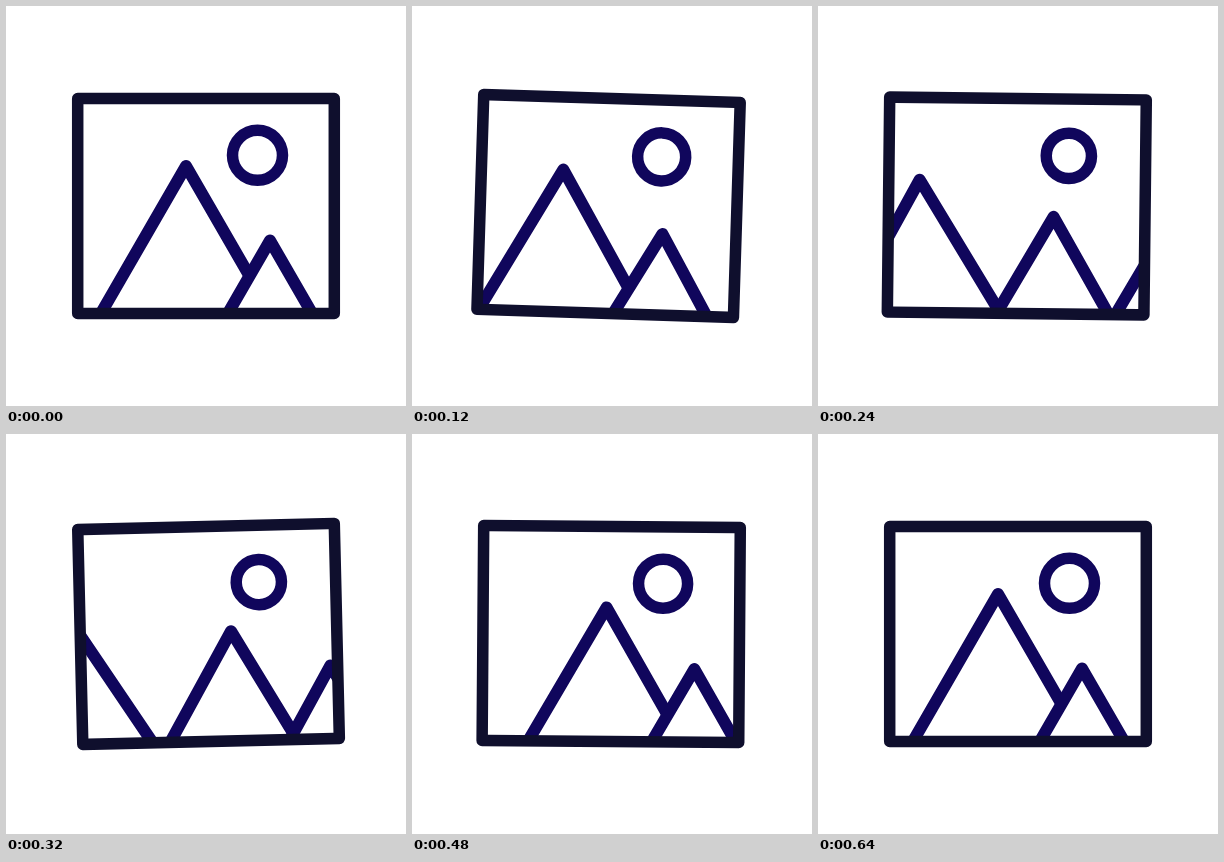
Recreate the animation shown at these times as an HTML page without scripts. Size 400x400 px, loop 720 ms.

```html
<!DOCTYPE html>
<html lang="en">
<head>
<meta charset="utf-8">
<title>Swinging picture</title>
<style>
  @property --n { syntax: "<number>"; inherits: true; initial-value: 0; }
  @property --t { syntax: "<number>"; inherits: true; initial-value: 0; }
  @property --p { syntax: "<number>"; inherits: true; initial-value: 0; }
  @property --q { syntax: "<number>"; inherits: true; initial-value: 1; }

  html, body { margin: 0; width: 100%; height: 100%; overflow: hidden; background: #fff; }

  /* --n counts 40 ms ticks, --t is linear progress, --p eased progress, --q what remains */
  svg {
    display: block; width: 100%; height: 100%;
    --t: min(1, var(--n) / 16);
    --p: calc(.25 * var(--t)
      + .75 * pow(var(--t), 2) * (3 - 2 * var(--t))
      - .4 * pow(var(--t), 2) * pow(1 - var(--t), 4));
    --q: calc(1 - var(--p));
    animation: tick 720ms steps(18) infinite;
    fill: #fff; stroke: #10065c; stroke-width: 11.5; stroke-linejoin: round;
  }
  @keyframes tick { from { --n: 0; } to { --n: 18; } }

  /* Damped swing built from four half-cosine moves */
  .picture {
    --a: cos(clamp(0deg, var(--n) * 48deg, 180deg));
    --b: cos(clamp(0deg, (var(--n) - 4.25) * 45deg, 180deg));
    --c: cos(clamp(0deg, (var(--n) - 7.75) * 45deg, 180deg));
    --d: cos(clamp(0deg, (var(--n) - 12) * 45deg, 180deg));
    transform-origin: 200px 92px;
    transform: rotate(calc(1deg * (1.7 * var(--b) - var(--a) - .91 * var(--c) + .21 * var(--d))));
  }

  /* The sun shrinks a little and grows back over 14 ticks */
  .sun { r: calc(23.75px + 1.25px * cos(min(360deg, var(--n) * 360deg / 14))); }

  .peak { stroke-width: 12; }
  .leaving {
    transform:
      translate(calc(180px - 240px * var(--p)), calc(160px + 46px * var(--p)))
      rotate(calc(-5.5deg * var(--p)));
  }
  .growing {
    transform: translate(calc(264px - 84px * var(--p)), calc(234.5px - 74.5px * var(--p)));
  }
  .entering {
    transform: translate(calc(264px + 105px * var(--q) + 15px * var(--q) * var(--q)), 234.5px);
  }
  .frame { fill: none; stroke: #0f0f2d; }
</style>
</head>
<body>
<svg viewBox="0 0 400 400">
  <defs>
    <path id="peak" d="M-100 173.2 0 0 100 173.2"/>
    <clipPath id="inside"><rect x="72" y="92.5" width="256" height="215"/></clipPath>
  </defs>
  <g class="picture">
    <circle class="sun" cx="251.5" cy="149.3" r="25"/>
    <g clip-path="url(#inside)">
      <use class="peak leaving" href="#peak"/>
      <use class="peak growing" href="#peak"/>
      <use class="peak entering" href="#peak"/>
    </g>
    <rect class="frame" x="71.7" y="92.5" width="256.6" height="215"/>
  </g>
</svg>
</body>
</html>
```
